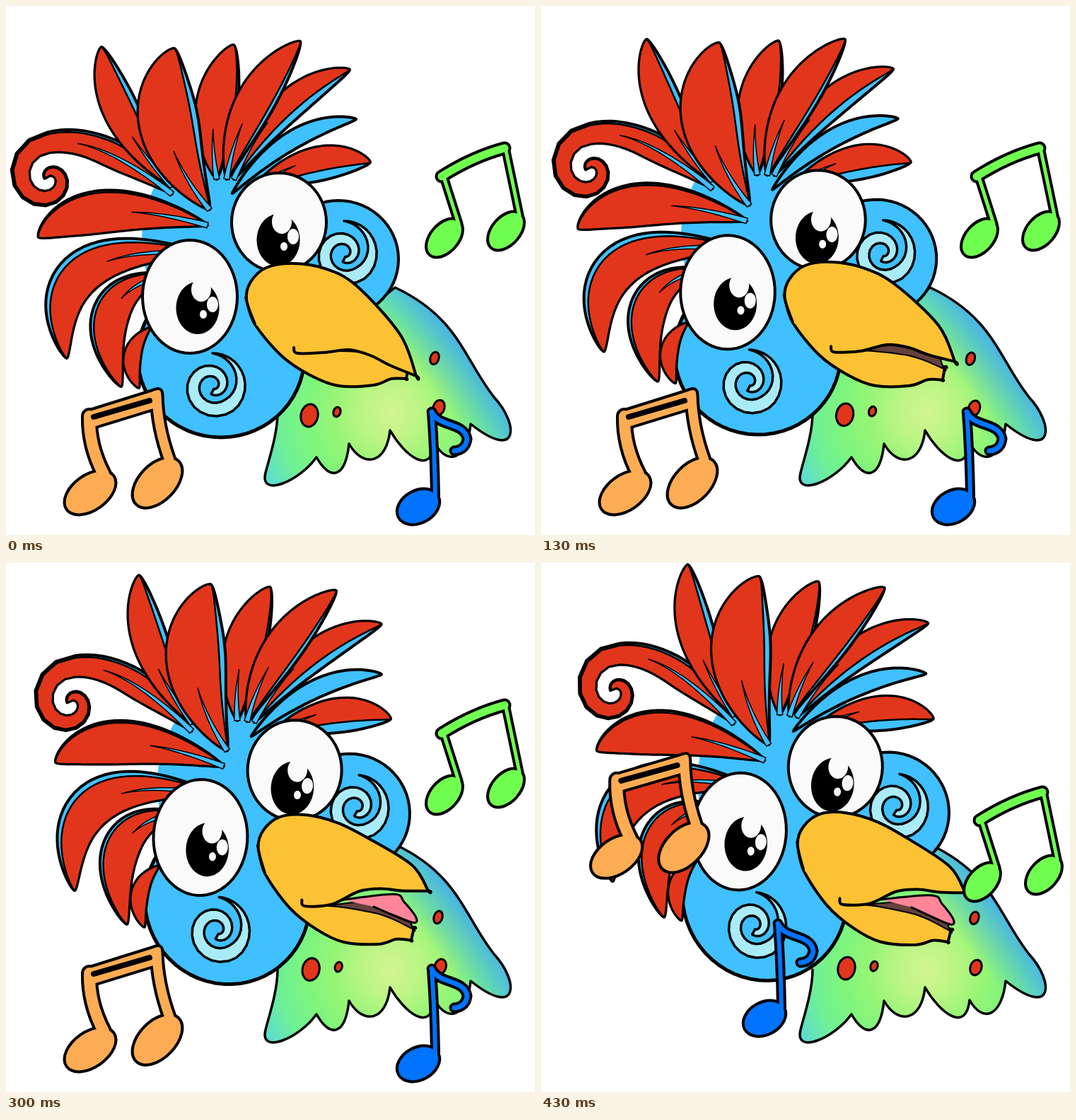
An HTML page with a canvas for the animation above (510 ms loop, 748 px wide and 748 px high).

```html
<!DOCTYPE html>
<html>
<head>
<meta charset="utf-8">
<title>Singing bird</title>
<style>
html, body { margin: 0; width: 100%; height: 100%; overflow: hidden; background: #fff; }
canvas { display: block; }
</style>
</head>
<body>
<canvas id="stage" width="748" height="748"></canvas>
<script>
const ctx = document.getElementById('stage').getContext('2d');
const RED = '#e2361c', BLUE = '#40c0ff', GOLD = '#fcc234', PALE = '#a9ecf8', WHITE = '#fafafa', INK = '#000';
const LOOP = 510, LAST_POSE = 430, SWING = 460, JUMP = 330;
const { PI, sin, cos, min, max } = Math;
let sway = 0, open = 0;

// The head leans as a soft body: the crest travels furthest, the chin least.
const lean = (x, y) => [
  x + sway * (82 - .2 * y + .00012 * y * y - .016 * (x - 300)),
  y + sway * .147 * (x - 520) * (1 - .35 * (y / 600) ** 2)
];
const beak = (x, y) => {
  const [u, v] = lean(x, y);
  return [u + 4 * sway, v + 4 * sway];
};
// The upper bill lifts from its hinge: the lip evenly, the ridge mostly at the tip.
const bill = (x, y) => {
  const isLip = y > 430 + (x - 440) * .66;
  const lift = open * max(0, (x - 440) / 140) ** (isLip ? 1 : 2.5);
  const [u, v] = beak(x, y);
  return [u + 10 * lift, v - 67 * lift];
};

function paint(path, fill, width = 4, ink = INK) {
  if (fill) { ctx.fillStyle = fill; ctx.fill(path); }
  if (width) { ctx.lineWidth = width; ctx.strokeStyle = ink; ctx.stroke(path); }
}
function polygon(points) {
  const path = new Path2D();
  points.forEach(p => path.lineTo(...p));
  path.closePath();
  return path;
}
function oval(x, y, rx, ry, turn = 0) {
  const path = new Path2D();
  path.ellipse(x, y, rx, ry, turn, 0, 2 * PI);
  return path;
}
const softOval = (x, y, rx, ry) => polygon(Array.from({ length: 60 }, (_, i) =>
  lean(x + rx * cos(i * PI / 30), y + ry * sin(i * PI / 30))));

// Band of varying half-width along a spine; shift moves it sideways.
function ribbon(spine, half, shift = () => 0, end = 1) {
  const left = [], right = [], count = 50;
  for (let i = 0; i <= count; i++) {
    const u = end * (.5 - .5 * cos(PI * i / count));
    const [x, y] = spine(u), [ax, ay] = spine(u - .001), [bx, by] = spine(u + .001);
    const length = Math.hypot(bx - ax, by - ay);
    const nx = (ay - by) / length, ny = (bx - ax) / length;
    const a = shift(u) - half(u), b = shift(u) + half(u);
    left.push(lean(x + nx * a, y + ny * a));
    right.unshift(lean(x + nx * b, y + ny * b));
  }
  return polygon([...left, ...right]);
}
const arch = (a, b, c) => u => [0, 1].map(k =>
  (1 - u) ** 2 * a[k] + 2 * u * (1 - u) * b[k] + u * u * c[k]);
const spiral = (x, y, r, shrink, turns, way) => u => {
  const angle = way * 2 * PI * turns * u - PI / 2, radius = r - shrink * turns * u;
  return [x + radius * cos(angle), y + radius * sin(angle)];
};
const blade = u => max(0, sin(PI * min(1, max(0, u)) ** 1.12)) ** .7;

// Blue feather with a red vane; the strip is the blue left showing on its right.
function feather(spine, width, strip, profile = blade) {
  paint(ribbon(spine, u => width * profile(u)), BLUE);
  if (strip < 0) return;
  paint(ribbon(spine, u => (width - strip / 2) * profile(u), u => -strip / 2 * profile(u)), RED, 2.5);
  if (width > 20) paint(ribbon(spine, u => 4 * (1 - u / .36), u => -strip / 2 * profile(u), .36), BLUE, 1.5);
}

// Smooth open curve through "x,y" points; "!" marks a sharp corner.
function curve(text, map) {
  const p = text.split(' ').flatMap(s => {
    const q = map(...s.replace('!', '').split(',').map(Number));
    return s.endsWith('!') ? [q, q] : [q];
  });
  const path = new Path2D(), at = i => p[max(0, min(p.length - 1, i))];
  path.moveTo(...p[0]);
  for (let i = 0; i < p.length - 1; i++) {
    const [a, b, c, d] = [at(i - 1), at(i), at(i + 1), at(i + 2)];
    path.bezierCurveTo(b[0] + (c[0] - a[0]) / 6, b[1] + (c[1] - a[1]) / 6,
      c[0] - (d[0] - b[0]) / 6, c[1] - (d[1] - b[1]) / 6, ...c);
  }
  return path;
}

function shade(gradient, ...tones) {
  tones.forEach((tone, i) => gradient.addColorStop(i / (tones.length - 1), tone));
  return gradient;
}
function drawBody() {
  const path = new Path2D('M450,480L550,398C640,440 648,500 690,553C726,592 725,645 657,591');
  let [x, y] = [657, 591];
  for (const [u, v] of [[606, 618], [543, 600], [485, 619], [439, 638]]) {
    path.bezierCurveTo(x - 5, y + 48, u + 20, v + 35, u, v);
    [x, y] = [u, v];
  }
  path.bezierCurveTo(415, 672, 358, 696, 367, 660);
  path.bezierCurveTo(372, 640, 384, 605, 384, 575);
  paint(path, shade(ctx.createRadialGradient(545, 575, 0, 545, 575, 200),
    '#d2f592', '#bdf585', '#98f576', '#7ef57c', '#6ff096', '#5cdcd0'), 0);
  paint(path, shade(ctx.createLinearGradient(600, 538, 668, 487), '#3ea5fb00', '#3ea5fb'), 3.5);
  paint(oval(429 + 3 * sway, 579 - 6 * sway, 12, 16, .2), RED, 3);
  paint(oval(468 + 3 * sway, 574 - 4 * sway, 5, 7, .3), RED, 3);
  paint(oval(606 + 7 * sway, 498 + 4 * sway, 6, 9, .3), RED, 3);
  paint(oval(612 + 3 * sway, 568 + 4 * sway, 8, 11, .3), RED, 3);
}

function drawCrest() {
  const curlRoot = arch([235, 266], [130, 178], [60, 193]), curlEnd = spiral(60, 243, 50, 43, 1.12, -1);
  feather(u => u < .5 ? curlRoot(2 * u) : curlEnd(2 * u - 1), 24, 5,
    u => sin(min(1, 4 * u) * PI / 2) * (1 - .8 * u));
  feather(arch([235, 255], [148, 155], [135, 58]), 25, 8);
  feather(arch([204, 455], [162, 490], [188, 540]), 12, 0);
  feather(arch([225, 380], [105, 405], [163, 538]), 26, 5);
  feather(arch([275, 350], [40, 325], [86, 498]), 30, 8);
  feather(arch([285, 310], [120, 262], [46, 327]), 30, 3);
  feather(arch([298, 245], [284, 145], [322, 55]), 29, 4);
  feather(arch([345, 262], [440, 208], [515, 221]), 24, 14);
  feather(arch([320, 265], [400, 168], [495, 160]), 13, -1);
  feather(arch([322, 245], [388, 122], [486, 90]), 21, 11);
  feather(arch([312, 245], [336, 132], [416, 50]), 27, 6);
  feather(arch([288, 288], [200, 170], [238, 60]), 42, 9);
}

function drawHead() {
  paint(softOval(470, 358, 85, 83), BLUE);
  paint(softOval(304, 495, 118, 115), BLUE, 5);
  paint(softOval(315, 330, 123, 143), BLUE, 0);
  paint(softOval(315, 440, 108, 120), BLUE, 0);
  drawCrest();
  const swirlWidth = u => 10 * min(1, 4 * u) * (1 - .6 * u * u);
  for (const [x, y] of [[292, 537], [478, 350]])
    paint(ribbon(spiral(x, y, 46, 25.3, 1.5, 1), swirlWidth), PALE, 3.5);
}

function drawEye(x, y, ry, px, py) {
  const spot = (dx, dy, rx, ry, tone) => paint(softOval(px + dx, py + dy, rx, ry), tone, 0);
  paint(softOval(x, y, 67, ry), WHITE);
  spot(0, 0, 30.5, 37, INK);
  spot(5, -26, 14, 17, WHITE);
  spot(21, -5, 8, 11, WHITE);
  spot(8, 9, 5, 6, WHITE);
}

function drawBeak() {
  paint(curve('340,415! 352,450 390,495 430,522 470,537 520,536 545,527 566,527! 569,509! 535,497 495,488 447,487!', beak), GOLD);
  if (open > .1) paint(curve('447,487! 540,468! 560,490! 567,511! 520,494 447,487!', beak), '#65413c', 2);
  if (open > .4) paint(curve('465,478! 537,464 553,474 571,494 568,502 540,494 510,484', beak), '#ff8599', 3);
  paint(curve('352,450 340,415 346,390 368,370 405,364 450,371 495,395 557,464 580,523! 545,509 515,494 485,486 450,490 412,491 407,483', bill), GOLD);
}

// Every part is laid down in ink first, then again in colour.
function drawNote(color, heads, lines, [dx, dy], turn = 0, bar = '') {
  ctx.save();
  ctx.translate(dx, dy);
  ctx.rotate(turn);
  for (const [tone, edge] of [[INK, 8], [color, 0]]) {
    heads.forEach(head => paint(oval(...head), tone, edge));
    lines.forEach(([d, width]) => paint(new Path2D(d), null, width + edge, tone));
  }
  paint(new Path2D(bar), null, 8);
  ctx.restore();
}
function drawNotes(jumped) {
  const hop = (...move) => jumped ? move : [0, 0];
  drawNote('#fdac53', [[119, 688, 39, 23, -.62], [214, 674, 41, 24, -.8]],
    [['M118,580Q117,622 138,662', 16], ['M213,550Q214,595 231,642', 13], ['M116,578L215,547', 8],
      ['M122,587L210,560', 16]], hop(-2, -275), jumped ? .015 : 0, 'M124,581L203,558');
  drawNote('#70ff50', [[620, 328, 30, 18, -.85], [707, 318, 30, 18, -.85]],
    [['M616,241Q660,213 705,201', 11], ['M620,245L640,308', 5], ['M707,205L726,296', 5]], hop(4, 123));
  drawNote('#0073ff', [[583, 708, 30, 21, -.5]],
    [['M602,575Q606,630 607,692', 6], ['M602,574C612,596 648,588 652,612Q650,628 634,629', 7]], hop(-267, -64));
}

function draw() {
  // Poses change 0 and 30 ms into every tenth of a second.
  const t = performance.now() % LOOP, beat = t % 100;
  const pose = min(LAST_POSE, t - beat + (beat < 30 ? 0 : 30)), u = pose / SWING;
  sway = u * u * (3 - 2 * u);
  open = min(1, sway * 1.7);
  ctx.clearRect(0, 0, 748, 748);
  ctx.lineJoin = ctx.lineCap = 'round';
  drawBody();
  drawHead();
  drawEye(260, 411, 80, 271, 427);
  drawEye(386, 306, 70, 385, 331);
  drawBeak();
  drawNotes(pose >= JUMP);
  requestAnimationFrame(draw);
}
draw();
</script>
</body>
</html>
```
